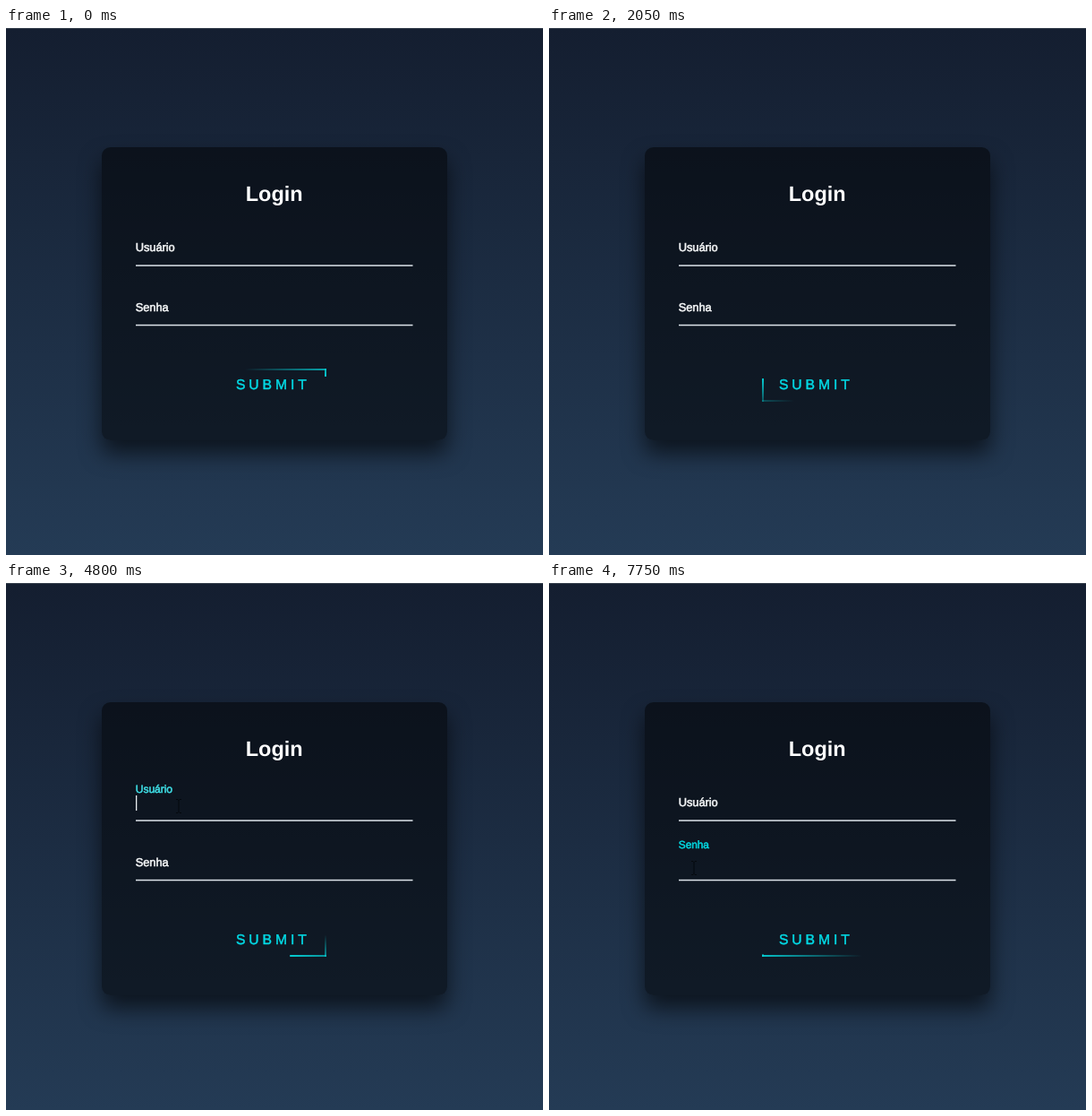
Write an HTML page that moves like this. It is 600 by 588 pixels and loops after 8 s.

```html
<!DOCTYPE html>
<html lang="pt">
<head>
<meta charset="utf-8">
<title>Login</title>
<style>
  html, body { margin: 0; width: 100%; height: 100%; overflow: hidden; }
  body { position: relative; background: linear-gradient(#141e30, #243b55); }
  .edge { position: absolute; left: 0; top: 0; width: 100%; height: 1px; background: #38424f; }
  .card {
    position: absolute; left: 107px; top: 133px; width: 386px; height: 327px;
    border-radius: 9.6px; background: rgba(0, 0, 0, .5);
    box-shadow: 0 14.5px 24px rgba(0, 0, 0, .6);
  }
  .button { position: absolute; left: 238px; top: 380px; width: 120px; height: 37px; overflow: hidden; }
  .button i { position: absolute; --glow: #05ced4; }
  .h { left: 0; width: 120px; height: 2px; }
  .v { top: 0; width: 2px; height: 37px; }
  svg { position: absolute; left: 0; top: 0; }
  text { font-family: "Liberation Sans", Arial, sans-serif; text-rendering: geometricPrecision; }
  .label { letter-spacing: -.1px; stroke-width: .55px; }
  .line { fill: #dde4ea; }
</style>
</head>
<body>
<div class="edge"></div>
<div class="card"></div>
<div class="button">
  <i class="h" style="top:0; background:linear-gradient(90deg, transparent, var(--glow))"></i>
  <i class="v" style="right:0; background:linear-gradient(180deg, transparent, var(--glow))"></i>
  <i class="h" style="bottom:0; background:linear-gradient(270deg, transparent, var(--glow))"></i>
  <i class="v" style="left:0; background:linear-gradient(0deg, transparent, var(--glow))"></i>
</div>
<svg width="600" height="588" viewBox="0 0 600 588">
  <text x="299.7" y="193" text-anchor="middle" font-size="23.5" font-weight="bold" fill="#fff">Login</text>
  <rect class="line" x="145" y="264.3" width="309.5" height="1.5"/>
  <rect class="line" x="145" y="330.8" width="309.5" height="1.5"/>
  <text class="label" id="user" x="144.8">Usuário</text>
  <text class="label" id="pass" x="144.8">Senha</text>
  <text x="257" y="403.4" font-size="15.7" letter-spacing="3.9" fill="#03dbe6" stroke="#03dbe6" stroke-width=".45">SUBMIT</text>
  <rect id="caret" x="145" width="1.3" height="17" fill="#e8edf0"/>
  <path id="beam" d="M-3 -7.5H-1L0 -6.5L1 -7.5H3M0 -6.5V6.5M-3 7.5H-1L0 6.5L1 7.5H3" fill="none" stroke="#020407" stroke-opacity=".75"/>
  <path id="arrow" d="M0 0V14.2L3.3 11.2L5.6 17L8 16L5.7 10.6H10.2Z" fill="#fff" stroke="#0b0f16" stroke-width=".5"/>
</svg>
<script>
const LOOP = 8000, STEP = 50, FADE = 325;
const USER_CLICK = 4510, PASS_CLICK = 7200;
const $ = id => document.getElementById(id);
const bars = [...document.querySelectorAll('.button i')];

// spans in which the page stands still
const rests = [[850, 950], [1600, 2050], [2800, 3100], [3450, 3900],
  [4650, 4950], [5650, 6150], [6650, 7100]];
// time, turns of the light around the button
const turns = [[0, .31], [1000, 2.016], [2050, 2.925], [2950, 4.02],
  [4800, 5.585], [5850, 6.677], [7750, 8.767]];
// time, x, y
const mouse = [[2650, 172, 247], [2950, 152.5, 238], [3050, 152.5, 238],
  [3400, 193, 249], [6150, 193, 249], [6650, 162, 318]];

const clamp = x => Math.max(0, Math.min(1, x));
const ease = x => { const s = 1 - (1 - clamp(x)) ** 2; return s * s * (3 - 2 * s); };
const mix = (a, b, k) => a + (b - a) * k;
const within = (t, ...spans) => spans.some(([a, b]) => t >= a && t < b);
const show = (el, on) => el.setAttribute('visibility', on ? 'visible' : 'hidden');

// page time: elapsed time without the rests
const active = t => rests.reduce((sum, [a, b]) => sum - Math.max(0, Math.min(t, b) - a), t);

function track(keys, t, k = 1) {
  const i = keys.findIndex(key => key[0] > t);
  if (i === 0) return keys[0][k];
  if (i < 0) return keys[keys.length - 1][k];
  const a = keys[i - 1], b = keys[i];
  return mix(a[k], b[k], (t - a[0]) / (b[0] - a[0]));
}

const activeTurns = turns.map(([t, n]) => [active(t), n]);
const fade = (t, click) => ease((active(t) - active(click)) / FADE);

function spin(turn) {
  bars.forEach((bar, i) => {
    const local = (turn - i / 4 + 1) % 1;
    const shift = (4 * local - 1) * (i < 2 ? 100 : -100);
    bar.style.transform = `translate${i % 2 ? 'Y' : 'X'}(${shift}%)`;
  });
}

function lift(el, base, k) {
  const color = `rgb(${mix(245, 3, k)}, ${mix(247, 215, k)}, ${mix(248, 224, k)})`;
  el.setAttribute('y', base - 20.3 * k);
  el.style.fontSize = 12.9 - k + 'px';
  el.style.fill = el.style.stroke = color;
}

function draw(now) {
  const t = Math.floor((now % LOOP) / STEP) * STEP;
  const passFade = fade(t, PASS_CLICK);
  spin(track(activeTurns, active(t)));
  lift($('user'), 248.9, fade(t, USER_CLICK) - passFade);
  lift($('pass'), 315.8, passFade);

  $('caret').setAttribute('y', t < PASS_CLICK ? 237 : 303.5);
  show($('caret'), within(t, [USER_CLICK, 5050], [5400, 7550]));

  const onLabel = within(t, [2650, 3400], [6550, PASS_CLICK + STEP]);
  const spot = `translate(${track(mouse, t, 1)} ${track(mouse, t, 2)})`;
  $('arrow').setAttribute('transform', spot);
  $('beam').setAttribute('transform', spot);
  show($('arrow'), onLabel);
  show($('beam'), t >= 3400 && !onLabel);
}

const start = performance.now();
function tick() {
  draw(performance.now() - start);
  requestAnimationFrame(tick);
}
tick();
</script>
</body>
</html>
```
